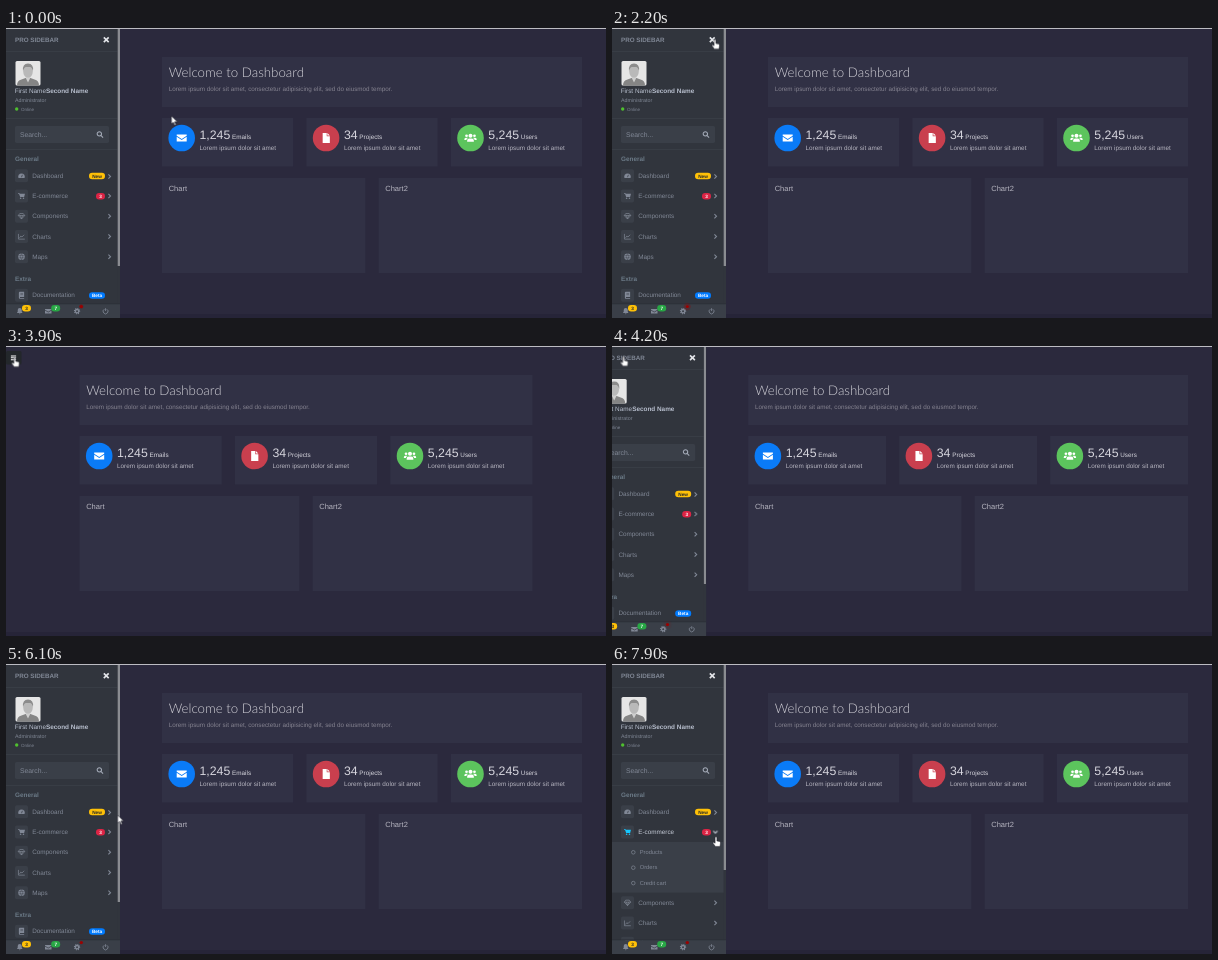
An HTML page for the animation above (8 s loop, 600x290 px).

```html
<!DOCTYPE html>
<html lang="en">
<head>
<meta charset="utf-8">
<title>Dashboard with sliding sidebar</title>
<style>
  /* 1 = sidebar open, 0 = closed */
  @property --open { syntax: "<number>"; inherits: true; initial-value: 1; }

  html, body { margin: 0; width: 100%; height: 100%; overflow: hidden; background: #2b293d; }

  svg.stage {
    --w: min(453px, 552px - 132px * var(--open));
    --left: calc(300px + 66px * var(--open) - var(--w) / 2);
    display: block; width: 600px; height: 290px;
    font: 6.35px "Liberation Sans", Arial, sans-serif;
    text-rendering: geometricPrecision;
    animation: slide 8s infinite;
  }
  text { fill: currentColor; white-space: pre; }
  symbol { overflow: visible; fill: currentColor; }
  .line { fill: none; stroke: currentColor; stroke-width: 1.6; }
  .bold { font-weight: 700; }

  /* Main content */
  .main { transform: translateX(var(--left)); color: #b5b4bf; }
  .panel { fill: #313145; }
  .full { width: var(--w); }
  .third { width: calc((var(--w) - 26.4px) / 3); }
  .half { width: calc((var(--w) - 13.2px) / 2); }
  .c2 { transform: translateX(calc((var(--w) + 13.2px) / 3)); }
  .c3 { transform: translateX(calc((var(--w) + 13.2px) * 2 / 3)); }
  .h2 { transform: translateX(calc((var(--w) + 13.2px) / 2)); }
  .title { font: 300 13.3px Lato, "Open Sans", sans-serif; color: #d3d2d9; }
  .muted { color: #858390; }
  .count { color: #d6d5dd; }
  .num { font-size: 12.3px; }
  .head { font-size: 7.5px; }
  .white { color: #fff; }

  /* Sidebar */
  .side { transform: translateX(calc(132px * (var(--open) - 1))); color: #818896; }
  .bg { fill: #31353d; }
  .tile { fill: #3a3f48; }
  .rule { stroke: #3a3f48; }
  .row { --ink: #818896; --tip: #818896; color: var(--ink); }
  .row use { color: var(--tip); }
  .row .chev { fill: none; stroke: var(--ink); stroke-width: 1.1; }
  .pill { font-size: 4.7px; font-weight: 700; text-anchor: middle; }
  .dash { animation: over-dash 8s step-end infinite; }
  .shop { animation: over-shop 8s step-end infinite; }
  .turn { transform-origin: 103.4px 0; animation: turn 8s infinite; }
  .below { animation: drop 8s infinite; }
  .thumb { fill: #8a8c91; height: 238px; animation: shrink 8s infinite; }
  .sub { font-size: 5.75px; }
  .sub circle { fill: none; stroke: currentColor; stroke-width: .7; }
  .ring { fill: none; stroke: #980303; stroke-width: .8; transform-origin: 75.3px 278.6px; animation: sonar 1.6s infinite; }

  .toggle { transform: translateX(calc(-17.6px * var(--open))); }
  .toggle rect { fill: #343a40; animation: press 8s step-end infinite; }

  .cursor { fill: #fff; stroke: #22222c; stroke-width: .5; animation: move 8s linear infinite; }
  .arrow { animation: arrow 8s step-end infinite; }
  .hand { animation: hand 8s step-end infinite; }

  @keyframes slide {
    0%, 28.75% { --open: 1; animation-timing-function: ease; }
    32.5% { --open: 0; }
    50.44% { --open: 0; animation-timing-function: ease; }
    54.19%, 100% { --open: 1; }
  }
  @keyframes over-dash {
    0%, 89.5% { --ink: #818896; --tip: #818896; }
    80% { --ink: #d0d5de; --tip: #28b8cf; }
  }
  @keyframes over-shop {
    0% { --ink: #818896; --tip: #818896; }
    89.5%, 100% { --ink: #c3c9d5; --tip: #16c7ff; }
  }
  @keyframes turn { 0%, 92.5% { transform: none; } 95.5%, 100% { transform: rotate(90deg); } }
  @keyframes drop { 0%, 92.5% { transform: none; } 95.5%, 100% { transform: translateY(50.6px); } }
  @keyframes shrink { 0%, 92.5% { height: 238px; } 95.5%, 100% { height: 206px; } }
  @keyframes sonar { 0% { transform: scale(.9); opacity: 1; } 100% { transform: scale(2); opacity: 0; } }
  @keyframes press { 0%, 50.44%, 100% { fill: #343a40; } 44% { fill: #23272b; } }
  @keyframes arrow { 0%, 29.5%, 57% { opacity: 1; } 20%, 44%, 79.5%, 100% { opacity: 0; } }
  @keyframes hand { 0%, 29.5%, 57% { opacity: 0; } 20%, 44%, 79.5%, 100% { opacity: 1; } }
  @keyframes move {
    0% { transform: translate(165.5px, 88px); }
    12% { transform: translate(148px, 62px); }
    21% { transform: translate(103.5px, 13px); }
    27.5%, 29% { transform: translate(103px, 11.5px); }
    35% { transform: translate(40.5px, 24.5px); }
    40% { transform: translate(24px, 28px); }
    45% { transform: translate(8px, 12px); }
    50.4% { transform: translate(9px, 11px); }
    52.5% { transform: translate(11.5px, 10.5px); }
    56% { transform: translate(14px, 14px); }
    63.75% { transform: translate(113.5px, 152px); }
    70% { transform: translate(118px, 160px); }
    80% { transform: translate(108px, 146px); }
    86.25% { transform: translate(104.5px, 159.5px); }
    90% { transform: translate(103.5px, 168px); }
    98.75%, 100% { transform: translate(104px, 173px); }
  }
</style>
</head>
<body>
<svg class="stage" viewBox="0 0 600 290">
  <defs>
    <symbol id="gauge" viewBox="0 0 16 16"><path d="M1 13a7.5 7.5 0 1 1 14 0z"/><path d="M8 11.5L10 6" stroke="#3a3f48" stroke-width="1.8"/></symbol>
    <symbol id="cart" viewBox="0 0 16 16"><path d="M0 1h3l.8 2H16l-2 7H5L2.2 2.6H0z"/><circle cx="6" cy="13" r="1.8"/><circle cx="12.5" cy="13" r="1.8"/></symbol>
    <symbol id="gem" viewBox="0 0 16 16"><path class="line" d="M4 2h8l3.3 4.5L8 14.5.7 6.5zM.7 6.5h14.6M5.4 6.5L8 14l2.6-7.5"/></symbol>
    <symbol id="trend" viewBox="0 0 16 16"><path class="line" d="M1 2v12h14.5M3.5 11l3-4 2.6 2.2L14 4"/></symbol>
    <symbol id="globe" viewBox="0 0 16 16"><circle cx="8" cy="8" r="7.5"/><path d="M1 5.5h14M1 10.5h14M8 .5q-6 7.5 0 15M8 .5q6 7.5 0 15" fill="none" stroke="#3a3f48"/></symbol>
    <symbol id="book" viewBox="0 0 16 16"><path d="M4 0h10v12H4.5v2H14v2H4q-2-.3-2-2.500V2Q2 .3 4 0z"/><path d="M5.500 4h6M5.500 6.500h6" stroke="#3a3f48"/></symbol>
    <symbol id="bell" viewBox="0 0 16 16"><path d="M8 0a5 5 0 0 1 5 5v4.500l2 3H1l2-3V5a5 5 0 0 1 5-5zM6 13.500h4a2 2 0 0 1-4 0z"/></symbol>
    <symbol id="mail" viewBox="0 0 16 16"><path d="M0 2.500h16v1.800L8 9.500 0 4.300zM0 6l8 5.200L16 6v7.500H0z"/></symbol>
    <symbol id="cog" viewBox="0 0 16 16"><circle class="line" cx="8" cy="8" r="4" style="stroke-width:3.2"/><circle class="line" cx="8" cy="8" r="6.300" stroke-dasharray="2.500 2.448" style="stroke-width:2.600"/></symbol>
    <symbol id="power" viewBox="0 0 16 16"><path class="line" d="M5 3a6 6 0 1 0 6 0M8 .500v7" style="stroke-width:2"/></symbol>
    <symbol id="search" viewBox="0 0 16 16"><path class="line" d="M11.500 6.500a5 5 0 1 1-10 0 5 5 0 0 1 10 0zM10 10l5 5" style="stroke-width:2.400"/></symbol>
    <symbol id="close" viewBox="0 0 16 16"><path class="line" d="M2 2l12 12M14 2L2 14" style="stroke-width:4"/></symbol>
    <symbol id="bars" viewBox="0 0 16 16"><path class="line" d="M1 3h14M1 8h14M1 13h14" style="stroke-width:2.800"/></symbol>
    <symbol id="file" viewBox="0 0 16 16"><path d="M2.500 0H9v5h5v11H2.500zM10 0l4 4h-4z"/></symbol>
    <symbol id="people" viewBox="0 0 16 16"><circle cx="8" cy="5" r="2.700"/><circle cx="2.700" cy="5" r="1.800"/><circle cx="13.300" cy="5" r="1.800"/><path d="M3.500 13q-.3-4.500 3-4.500h3q3.300 0 3 4.500zM-.3 10.500q0-3 2-3h2q1 0 1 .5-2 .8-2.200 2.500zM16.300 10.500q0-3-2-3h-2q-1 0-1 .5 2 .8 2.200 2.500z"/></symbol>
  </defs>

  <rect width="600" height="290" fill="#2b293d"/>
  <rect y="286" width="600" height="4" fill="#262438"/>

  <g class="main">
    <rect class="panel full" y="29" height="50"/>
    <text class="title" x="6.700" y="49">Welcome to Dashboard</text>
    <text class="muted" x="6.700" y="63" style="font-size:6.300px">Lorem ipsum dolor sit amet, consectetur adipisicing elit, sed do eiusmod tempor.</text>

    <g>
      <rect class="panel third" y="90" height="48.500"/>
      <circle cx="19.700" cy="110" r="13.300" fill="#0a7bf7"/>
      <use class="white" href="#mail" x="14.700" y="105" width="10" height="10"/>
      <text class="count" x="37.500" y="110.500"><tspan class="num">1,245</tspan> Emails</text>
      <text x="37.500" y="122.300">Lorem ipsum dolor sit amet</text>
    </g>
    <g class="c2">
      <rect class="panel third" y="90" height="48.500"/>
      <circle cx="19.700" cy="110" r="13.300" fill="#c93f4e"/>
      <use class="white" href="#file" x="14.700" y="105" width="10" height="10"/>
      <text class="count" x="37.500" y="110.500"><tspan class="num">34</tspan> Projects</text>
      <text x="37.500" y="122.300">Lorem ipsum dolor sit amet</text>
    </g>
    <g class="c3">
      <rect class="panel third" y="90" height="48.500"/>
      <circle cx="19.700" cy="110" r="13.300" fill="#5cc45d"/>
      <use class="white" href="#people" x="13.700" y="104" width="12" height="12"/>
      <text class="count" x="37.500" y="110.500"><tspan class="num">5,245</tspan> Users</text>
      <text x="37.500" y="122.300">Lorem ipsum dolor sit amet</text>
    </g>

    <rect class="panel half" y="150" height="95"/>
    <text class="head" x="6.700" y="162.700">Chart</text>
    <g class="h2">
      <rect class="panel half" y="150" height="95"/>
      <text class="head" x="6.700" y="162.700">Chart2</text>
    </g>
  </g>

  <g class="toggle white">
    <rect y="5" width="15.500" height="13.500" rx="1.500"/>
    <use href="#bars" x="4.500" y="8.800" width="6" height="6"/>
  </g>

  <g class="side">
    <rect class="bg" width="114" height="290"/>
    <text class="bold" x="9" y="14.200" style="font-size:6.270px">PRO SIDEBAR</text>
    <use href="#close" x="97" y="8.500" width="6.500" height="6.500" color="#e3e5e9"/>
    <path class="rule" d="M0 23.500h111.500M0 90.500h111.500M0 121.500h111.500" stroke-width=".8"/>

    <rect x="9.500" y="33" width="25" height="24.500" rx="1.500" fill="#e6e6e6"/>
    <path d="M11 57.500q0-5 4.500-6l4-1.500h5l4 1.500q4.500 1 4.500 6z" fill="#858585"/>
    <path d="M19.500 49.500h5l-2.500 5z" fill="#cfcfcf"/>
    <ellipse cx="22" cy="43.500" rx="4.800" ry="6.300" fill="#b9b9b9"/>
    <path d="M17 43q-.8-7.500 5-7.500t5 7.500q-1-3.500-2.500-4h-5q-1.500.5-2.500 4z" fill="#8c8c8c"/>

    <text x="8.700" y="65" color="#b8bfce" style="font-size:6.400px">First Name<tspan class="bold">Second Name</tspan></text>
    <text x="9" y="73.500" style="font-size:5.300px">Administrator</text>
    <circle cx="10.700" cy="81" r="1.700" fill="#4fbf2f"/>
    <text x="15" y="82.700" style="font-size:4.500px">Online</text>

    <rect class="tile" x="9" y="98" width="94" height="17" rx="1.800"/>
    <text x="14" y="108.700" style="font-size:6.800px">Search...</text>
    <use href="#search" x="90.500" y="103" width="7" height="7" color="#a4abb8"/>
    <text class="bold" x="9" y="133" color="#6c7b88" style="font-size:6.400px">General</text>

    <g class="row dash" transform="translate(0 147.700)">
      <rect class="tile" x="9" y="-6.500" width="13" height="13" rx="1.800"/>
      <use href="#gauge" x="12" y="-3.500" width="7" height="7"/>
      <text x="26.200" y="2">Dashboard</text>
      <rect x="83" y="-3" width="16" height="6.500" rx="3.200" fill="#ffc107"/>
      <text class="pill" x="91" y="1.900" color="#212529">New</text>
      <path class="chev" d="M102.400-1.300l2.100 2.100-2.100 2.100"/>
    </g>

    <g class="row shop" transform="translate(0 168)">
      <rect class="tile" x="9" y="-6.500" width="13" height="13" rx="1.800"/>
      <use href="#cart" x="12" y="-3.500" width="7" height="7"/>
      <text x="26.200" y="2">E-commerce</text>
      <rect x="90" y="-3" width="9" height="6.500" rx="3.200" fill="#dc2445"/>
      <text class="pill white" x="94.500" y="1.900">3</text>
      <path class="chev turn" d="M102.400-2.100l2.100 2.100-2.100 2.100"/>
    </g>

    <g class="sub">
      <rect class="tile" y="178" width="111.500" height="50.600"/>
      <circle cx="21.300" cy="188.300" r="1.800"/><text x="27.700" y="190">Products</text>
      <circle cx="21.300" cy="203.700" r="1.800"/><text x="27.700" y="205.400">Orders</text>
      <circle cx="21.300" cy="219.100" r="1.800"/><text x="27.700" y="220.800">Credit cart</text>
    </g>

    <!-- Everything under the submenu slides down and uncovers it -->
    <g class="below">
      <rect class="bg" y="178" width="111.500" height="112"/>
      <g class="row" transform="translate(0 188.200)">
        <rect class="tile" x="9" y="-6.500" width="13" height="13" rx="1.800"/>
        <use href="#gem" x="12" y="-3.500" width="7" height="7"/>
        <text x="26.200" y="2">Components</text>
        <path class="chev" d="M102.400-2.100l2.100 2.100-2.100 2.100"/>
      </g>
      <g class="row" transform="translate(0 208.500)">
        <rect class="tile" x="9" y="-6.500" width="13" height="13" rx="1.800"/>
        <use href="#trend" x="12" y="-3.500" width="7" height="7"/>
        <text x="26.200" y="2">Charts</text>
        <path class="chev" d="M102.400-2.100l2.100 2.100-2.100 2.100"/>
      </g>
      <g class="row" transform="translate(0 228.700)">
        <rect class="tile" x="9" y="-6.500" width="13" height="13" rx="1.800"/>
        <use href="#globe" x="12" y="-3.500" width="7" height="7"/>
        <text x="26.200" y="2">Maps</text>
        <path class="chev" d="M102.400-2.100l2.100 2.100-2.100 2.100"/>
      </g>
      <text class="bold" x="9" y="252.500" color="#6c7b88" style="font-size:6.400px">Extra</text>
      <g class="row" transform="translate(0 267.300)">
        <rect class="tile" x="9" y="-6.500" width="13" height="13" rx="1.800"/>
        <use href="#book" x="12" y="-3.500" width="7" height="7"/>
        <text x="26.200" y="2">Documentation</text>
        <rect x="83" y="-3" width="16" height="6.500" rx="3.200" fill="#007bff"/>
        <text class="pill white" x="91" y="1.900">Beta</text>
      </g>
    </g>

    <rect class="thumb" x="111.700" width="2.300"/>

    <rect y="275.500" width="114" height="1" fill="#2b2f36"/>
    <rect class="tile" y="276.300" width="114" height="13.700"/>
    <use href="#bell" x="10.500" y="280" width="6.500" height="6.500"/>
    <use href="#mail" x="39" y="280" width="6.500" height="6.500"/>
    <use href="#cog" x="67.700" y="279.800" width="6.700" height="6.700"/>
    <use href="#power" x="96.300" y="280" width="6.500" height="6.500"/>
    <rect x="16" y="277" width="9" height="6.500" rx="3.200" fill="#ffc107"/>
    <text class="pill" x="20.500" y="281.900" color="#212529">3</text>
    <rect x="45.200" y="277" width="9" height="6.500" rx="3.200" fill="#28a745"/>
    <text class="pill white" x="49.700" y="281.900">7</text>
    <circle cx="75.300" cy="278.600" r="1.700" fill="#980303"/>
    <circle class="ring" cx="75.300" cy="278.600" r="1.700"/>
  </g>

  <rect width="600" height="1" fill="#bcbcc2"/>

  <g class="cursor">
    <path class="arrow" d="M0 0v8l1.900-1.800 1.300 3 1.200-.5-1.300-2.900h2.600z"/>
    <path class="hand" d="M-.9.700a.9.900 0 0 1 1.800 0v3.200l2.700.6q1 .3.900 1.400l-.5 3.500h-4.600l-2.400-3.200q-.1-1.100.9-.8l1.200.8z"/>
  </g>
</svg>
</body>
</html>
```
